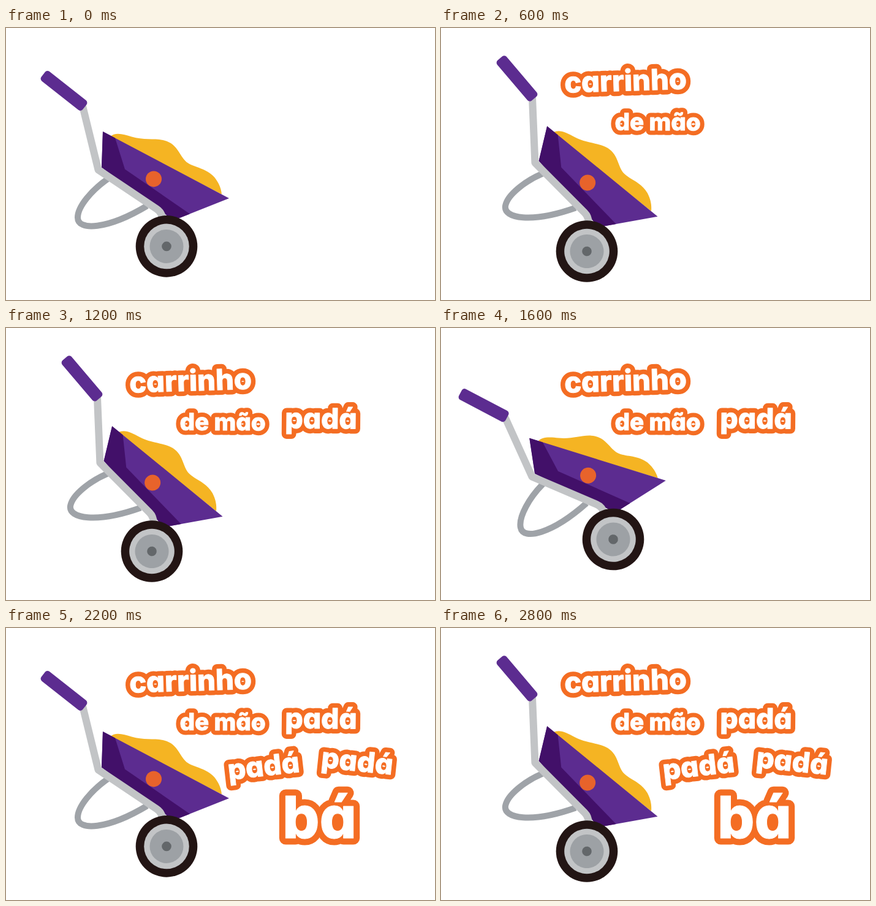
An HTML page for the animation above (3000 ms loop, 700 by 444 pixels).

```html
<!DOCTYPE html>
<html lang="pt">
<head>
<meta charset="utf-8">
<title>Carrinho de mão</title>
<style>
  html, body { margin: 0; width: 100%; height: 100%; overflow: hidden; background: #fff; }
  svg { display: block; width: 700px; height: 444px; }
  text {
    font-family: Inter, Lato, sans-serif;
    font-weight: 800;
    font-feature-settings: "cv11"; /* single-storey a */
    text-anchor: middle;
    stroke-linejoin: round;
  }
  .rim { fill: #f46d23; stroke: #f46d23; }
  .face { fill: #fff; stroke: #fff; stroke-width: 1px; }
</style>
</head>
<body>
<svg viewBox="0 0 700 444">
  <g id="cart">
    <!-- drawn around the wheel centre -->
    <g transform="translate(-262 -356)" fill="none">
      <path d="M166 246C140 264 117 291 117 309C117 331 165 329 230 290" stroke="#9fa3a8" stroke-width="10"/>
      <path d="M170 177C178 169 192 173 205 177C225 183 242 179 258 183C282 189 283 211 297 220C310 228 326 228 340 243C348 253 351 262 352 271Z" fill="#f5b423"/>
      <path d="M158 168.500L364 277.500L272 314L262 305L156 227Z" fill="#5c2c90"/>
      <path d="M158 168.500L178 179L194 230L300 303L272 314L262 305L156 227Z" fill="#421069"/>
      <path d="M125 127L150.500 231L246 295Q255 301 256 314" stroke="#c2c4c6" stroke-width="12" stroke-linejoin="round"/>
      <rect x="-43" y="-10" width="86" height="20" rx="5" transform="translate(94.500 102) rotate(38.300)" fill="#5c2c90"/>
      <circle cx="241" cy="246" r="13" fill="#e8632b"/>
    </g>
    <circle r="50.300" fill="#231514"/>
    <circle r="36.800" fill="#c2c4c6"/>
    <circle r="27.500" fill="#9da1a5"/>
    <circle r="7.800" fill="#63676a"/>
  </g>
  <g id="words"></g>
</svg>
<script>
const STEP = 200;
const POSES = {
  mid: [262, 356.4, 0],
  up: [238, 364.5, 11.4],
  low: [281, 345, -10.6]
};
const SEQUENCE = "mid low mid up low mid up mid low mid up mid low mid up".split(" ");

// text, centre x, baseline, tilt, font size, rim width, first step
const WORDS = [
  ["carrinho", 301.5, 102.5, -1.8, 47, 16, 1],
  ["de mão", 353.5, 167, 0.3, 38.5, 15, 2],
  ["padá", 514, 164, 0.5, 46, 16, 5],
  ["padá", 422, 241.5, -6.5, 46, 16, 9],
  ["padá", 571.5, 233.5, 6, 46, 16, 10],
  ["bá", 511.5, 342.5, 0, 95, 21, 11]
];

const cart = document.getElementById("cart");
const layer = document.getElementById("words");

function add(parent, tag, attrs, content = "") {
  const node = document.createElementNS("http://www.w3.org/2000/svg", tag);
  for (const key in attrs) node.setAttribute(key, attrs[key]);
  node.textContent = content;
  return parent.appendChild(node);
}

const words = WORDS.map(([label, x, y, tilt, size, rim, start]) => {
  const node = add(layer, "g", {
    transform: `translate(${x} ${y}) rotate(${tilt})`,
    "font-size": size
  });
  add(node, "text", { class: "rim", "stroke-width": rim }, label);
  add(node, "text", { class: "face" }, label);
  return { node, start };
});

function draw(time) {
  const step = Math.floor(time / STEP) % SEQUENCE.length;
  const [x, y, angle] = POSES[SEQUENCE[step]];
  cart.setAttribute("transform", `translate(${x} ${y}) rotate(${angle})`);
  for (const { node, start } of words) {
    node.setAttribute("visibility", step >= start ? "visible" : "hidden");
  }
}

const origin = performance.now();
function tick() {
  draw(performance.now() - origin);
  requestAnimationFrame(tick);
}
tick();
</script>
</body>
</html>
```
